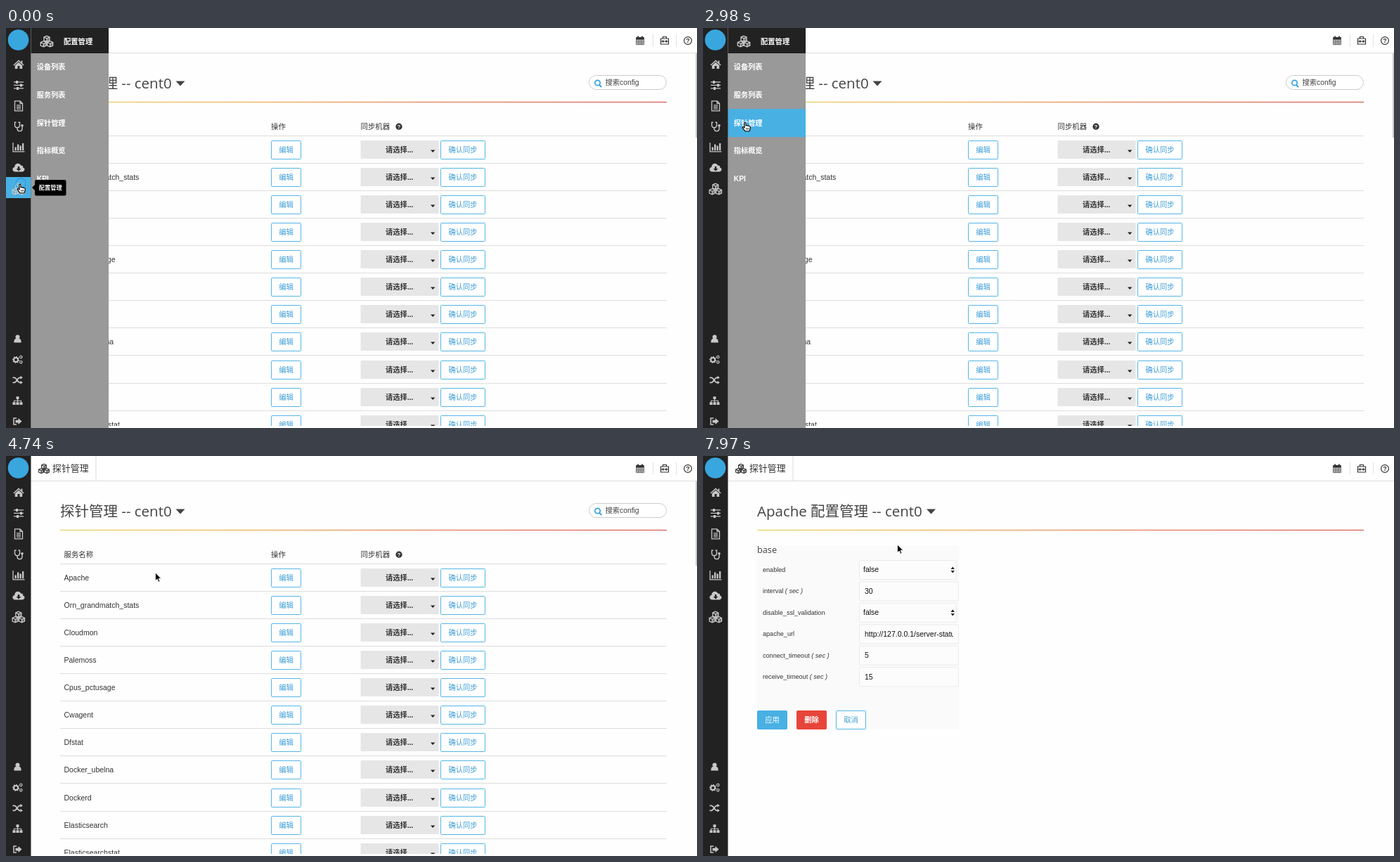
An HTML page that plays this animation: 983 by 569 pixels, repeating every 8 s.

```html
<!DOCTYPE html>
<html lang="zh-CN">
<head>
<meta charset="utf-8">
<title>探针管理</title>
<style>
html, body { margin: 0; width: 100%; height: 100%; overflow: hidden; background: #fefefe; }
svg { display: block; width: 983px; height: 569px; }
text { font: 10.5px "Liberation Sans", "Noto Sans CJK SC", "Noto Sans CJK", sans-serif; fill: #333; white-space: pre; }
.title { font-family: "Open Sans", "Noto Sans CJK SC", "Noto Sans CJK", sans-serif; fill: #444; }
</style>
</head>
<body>
<svg id="stage" viewBox="0 0 983 569" xmlns="http://www.w3.org/2000/svg"></svg>
<script>
const BLUE = '#49b0e4', DARK = '#222', LOOP = 8000;

const rect = (x, y, w, h, fill, more = '') =>
  `<rect x="${x}" y="${y}" width="${w}" height="${h}" fill="${fill}" ${more}/>`;
const text = (x, y, s, style = '', more = '') =>
  `<text x="${x}" y="${y}" style="${style}" ${more}>${s}</text>`;
const path = (d, more = '') => `<path d="${d}" ${more}/>`;
const at = (x, y, body, more = '') => `<g transform="translate(${x} ${y})" ${more}>${body}</g>`;
const group = (id, body, more = '') => `<g id="${id}" ${more}>${body}</g>`;
const line = (d, w = 1.4) => path(d, `fill="none" stroke="currentColor" stroke-width="${w}"`);
const solid = d => path(d, 'fill="currentColor"');
const dot = (x, y, r) => `<circle cx="${x}" cy="${y}" r="${r}" fill="currentColor"/>`;

// Icons, centred on their own origin
const cube = (x, y) => at(x, y,
  line('M0-4L4-2.3V2.3L0 4.2-4 2.3V-2.3ZM-4-2.2L0-.4 4-2.2M0-.4V4', 1.3) +
  solid('M0-.4L4-2.2V2.3L0 4.2Z').replace('/>', ' opacity=".45"/>'));
const cubes = cube(0, -3.7) + cube(-4.7, 3.7) + cube(4.7, 3.7);
const cog = (x, y, r) => at(x, y,
  `<circle r="${r}" fill="none" stroke="currentColor" stroke-width="${r * .65}"/>` +
  `<circle r="${r * 1.45}" fill="none" stroke="currentColor" stroke-width="${r * .4}" pathLength="16" stroke-dasharray="1"/>`);
const icons = {
  home: solid('M0-6.5L3.5-3.3V-5.5H5.3V-1.7L7.6.4 6.7 1.4 0-4.5-6.7 1.4-7.6.4ZM-5.2 1.2L0-3.3 5.2 1.2V6H1.5V2H-1.5V6H-5.2Z'),
  sliders: line('M-7-4.5H7M-7 0H7M-7 4.5H7', 1.3) + solid('M-4-6.5h3v4h-3ZM2-2h3v4h-3ZM-3 2.5h3v4h-3Z'),
  doc: line('M-5.5-7H2L5.5-3.5V7H-5.5ZM2-7V-3.5H5.5M-3-1H3M-3 1.7H3M-3 4.3H3', 1.3),
  scope: line('M-3.5-6H-5.5V-2C-5.5 2.6 1.5 2.6 1.5-2V-6H-.5M-2 1.5V3C-2 7.6 5 7.6 5 3V-.5') + dot(5, -1.5, 1.8),
  chart: line('M-8-6.5V6.2H8.5', 1.3) + solid('M-5.5 0h2.3v4.7h-2.3ZM-2-4h2.3v8.7h-2.3ZM1.5-2h2.3v6.7h-2.3ZM5-5.5h2.3v10.2h-2.3Z'),
  cloud: solid('M-4.5 5.5C-10 5.5-9.5-1-5.6-1.3-6-6.5 1.5-8 3-3.4 6-4.3 6.8-1.3 6-.4 10 .6 8.8 5.5 5 5.5Z') +
    path('M-1.2-2H1.2V1H3.4L0 4.4-3.4 1H-1.2Z', `fill="${DARK}"`),
  user: dot(0, -2.6, 3) + solid('M-5.2 5.5C-5.2 1-3.5 0-2.4 0H2.4C3.5 0 5.2 1 5.2 5.5Z'),
  cogs: cog(-2.4, .5, 3) + cog(4.8, -3.4, 1.6) + cog(4.8, 3.9, 1.6),
  shuffle: line('M-7-3.5H-4.5C-1.5-3.5 0 3.5 3 3.5H5M-7 3.5H-4.5C-1.5 3.5 0-3.5 3-3.5H5', 1.7) +
    solid('M4-6L7.3-3.5 4-1ZM4 1L7.3 3.5 4 6Z'),
  tree: solid('M-2-6h4v3.8h-4ZM-7 2h4v3.8h-4ZM-2 2h4v3.8h-4ZM3 2h4v3.8h-4Z') + line('M0-3V2M-5 2V0H5V2', 1.1),
  exit: line('M-1.5-4.5H-5.5V4.5H-1.5', 1.5) + solid('M-3-1.8H1V-4.5L6 0 1 4.5V1.8H-3Z'),
  calendar: line('M-5.4-4.5H5.4V5.6H-5.4ZM-5.4-1.6H5.4M-5.4.8H5.4M-5.4 3.2H5.4M-2.7-1.6V5.6M0-1.6V5.6M2.7-1.6V5.6', .8) +
    solid('M-5.4-5H5.4V-2H-5.4ZM-3.8-6.5h1.8v3h-1.8ZM2-6.5h1.8v3h-1.8Z'),
  kit: line('M-5.5-3H5.5V5H-5.5ZM-2.5-3V-5.5H2.5V-3M-5.5 1H5.5', 1.2) + solid('M-3.4-.4h2v3h-2ZM1.4-.4h2v3h-2Z'),
  help: '<circle r="5.4" fill="none" stroke="currentColor" stroke-width="1.2"/>' +
    text(0, 3.2, '?', 'font-size:9px;font-weight:bold', 'text-anchor="middle"')
};
const icon = (name, x, y) => at(x, y, icons[name]);

const button = (x, y, w, label, fill = '#fff', ink = '#3c9dd8', edge = '#55b5e6', weight = 400) =>
  rect(x + .5, y + .5, w - 1, 26, fill, `stroke="${edge}" rx="1"`) +
  text(x + w / 2, y + 17.1, label, `font-size:10.3px;font-weight:${weight};fill:${ink}`, 'text-anchor="middle"');
const caret = x => path(`M${x} 75.5h13l-6.5 7Z`, 'fill="#444"');
const title = s => text(77, 86, s, 'font-size:20.5px', 'class="title"');
const rule = y => rect(77, y, 863, 1.3, 'url(#warm)');

// Service list
const services = ['Apache', 'Orn_grandmatch_stats', 'Cloudmon', 'Palemoss', 'Cpus_pctusage', 'Cwagent',
  'Dfstat', 'Docker_ubelna', 'Dockerd', 'Elasticsearch', 'Elasticsearchstat'];
const tableHead = text(82.5, 144, '服务名称', 'font-size:10.4px') + text(377, 144, '操作', 'font-size:10.4px') +
  text(504.5, 144, '同步机器', 'font-size:10.4px') + '<circle cx="559" cy="140.2" r="4.6" fill="#333"/>' +
  text(559, 143.2, '?', 'font-size:8px;font-weight:bold;fill:#fff', 'text-anchor="middle"') +
  rect(77, 153, 863, 1, '#ddd');
const serviceRow = (name, i) => at(0, Math.round(i * 39.07),
  text(82.5, 177, name) + button(377, 160, 43, '编辑') +
  rect(504.5, 160, 111, 26, '#e6e6e6', 'rx="1"') +
  text(540, 177, '请选择...', 'font-size:10.3px;font-weight:bold') +
  path('M604 173.5h6.4l-3.2 3.5Z', 'fill="#222"') +
  button(618, 160, 64, '确认同步') + rect(77, 192, 863, 1, '#ddd'));
const search = rect(829.5, 67.5, 110, 20, '#fff', 'rx="10" stroke="#ccc"') +
  '<circle cx="841.5" cy="78" r="3.7" fill="none" stroke="#35a3dc" stroke-width="1.7"/>' +
  path('M844 81l3.2 3', 'stroke="#35a3dc" stroke-width="2"') + text(852.5, 81.2, '搜索config', 'font-size:10.3px;fill:#444');
const listPage = title('探针管理 -- cent0') + caret(241.5) + search + rule(104.8) + tableHead +
  services.map(serviceRow).join('') + group('editHot', button(377, 160, 43, '编辑', BLUE, '#fff')) +
  rect(981, 36, 2, 120, '#c9c9c9');
const listLoading = title('探针管理 --') + rule(104) + at(0, -1, tableHead);

// Configuration form
const fields = [['enabled', 'false'], ['interval', '30', 1], ['disable_ssl_validation', 'false'],
  ['apache_url', 'http://127.0.0.1/server-status'], ['connect_timeout', '5', 1], ['receive_timeout', '15', 1]];
const field = ([name, value, sec], i) => {
  const pick = value === 'false';
  return at(0, i * 30.45,
    text(85, 165, name + (sec ? '<tspan font-style="italic"> ( sec )</tspan>' : ''), 'font-size:9.1px') +
    rect(222.5, 148.5, pick ? 138 : 141, 27, '#fcfcfc', 'stroke="#ebebeb" rx="1"') +
    text(pick ? 228 : 230, 165.3, value, 'fill:#111', 'clip-path="url(#field)"') +
    (pick ? path('M352.5 161l2.7-3.6 2.7 3.6ZM352.5 163l2.7 3.6 2.7-3.6Z', 'fill="#222"') : ''));
};
const actions = button(77, 157, 43, '应用', BLUE, '#fff', BLUE, 500) +
  button(133, 157, 43, '删除', '#e8453a', '#fff', '#e8453a', 700) + button(189, 157, 43, '取消');
const form = rect(77, 128, 287, 260, '#fafafa') +
  text(77, 138, 'base', 'font-size:12.7px', 'class="title"') + fields.map(field).join('');

// Frame around the pages
const header = rect(35, 0, 948, 35, '#fff') + rect(35, 35, 948, 1, '#ddd') + rect(127.5, 0, 1, 35, '#ddd') +
  at(54, 18, `<g transform="scale(.85)">${cubes}</g>`) + text(66, 22.2, '探针管理', 'font-size:12.9px') +
  icon('calendar', 902, 18) + icon('kit', 937, 18) + icon('help', 970, 18) +
  rect(920, 9, 1, 18, '#e2e2e2') + rect(953, 9, 1, 18, '#e2e2e2');
const topIcons = ['home', 'sliders', 'doc', 'scope', 'chart', 'cloud'];
const lowIcons = ['user', 'cogs', 'shuffle', 'tree', 'exit'];
const sidebar = rect(0, 0, 35.5, 569, DARK) + group('sideHot', rect(0, 212, 35.5, 30, BLUE)) +
  '<circle cx="17.5" cy="17" r="14.8" fill="#39a6de"/>' +
  topIcons.map((n, i) => icon(n, 18, 52 + i * 29.4)).join('') + at(17.8, 229, cubes) +
  lowIcons.map((n, i) => icon(n, 16.5, 442 + i * 29.4)).join('');
const menuItems = ['设备列表', '服务列表', '探针管理', '指标概览', 'KPI'];
const menu = rect(35.5, 0, 110.5, 36, DARK) + rect(35.5, 36, 110.5, 533, '#999') +
  at(58, 19, cubes, 'color="#ccc"') + text(82, 22.8, '配置管理', 'font-size:10.3px;font-weight:bold;fill:#fff') +
  rect(35.5, 0, 110.5, 40, BLUE, 'id="menuHot"') +
  menuItems.map((s, i) => text(43.8, 59 + i * 39.8, s, 'font-size:10.2px;font-weight:bold;fill:#fff')).join('');
const tooltip = rect(41, 216, 44.5, 22.5, '#000', 'rx="2"') + path('M37 227l4-4v8Z') +
  text(63.2, 230.2, '配置管理', 'font-size:8.2px;font-weight:bold;fill:#fff', 'text-anchor="middle"');
const status = rect(-2.5, 560.5, 331, 14, '#f4f4f4', 'rx="2" stroke="#bbb"') +
  text(2, 569.8, 'app.cwiz.cn:3000/cmdb/config/edit?configName=Apache&amp;serviceName=collecto...', 'font-size:8.8px;fill:#222');
const arrow = path('M0 0V11.5L2.7 9 4.5 13.2 6.4 12.4 4.6 8.3H8.2Z', 'fill="#000" stroke="#fff" stroke-width=".8"');
const hand = path('M-1 1.2C-1-.2 1-.2 1 1.2V5C1.4 4.2 3 4.2 3.3 5.2 4 4.6 5.2 4.9 5.4 5.8 6.4 5.3 7.4 6 7.3 7V9.5L6 12.8H0L-3.6 8.2C-4.4 6.9-3 6-2 7L-1 8Z',
  'fill="#fff" stroke="#000" stroke-width="1.1" stroke-linejoin="round"') + path('M1.6 8V10.8M3.4 8V10.8M5.2 8V10.8', 'stroke="#000" stroke-width=".7"');
const ring = '<circle r="7.2" fill="none" stroke="#2d9fe0" stroke-width="1.4"/>';

const stage = document.getElementById('stage');
stage.innerHTML = `<defs>
  <linearGradient id="warm" gradientUnits="userSpaceOnUse" x1="77" x2="940"><stop stop-color="#e6d565"/>
    <stop offset=".3" stop-color="#edb458"/><stop offset=".65" stop-color="#e37d5c"/><stop offset="1" stop-color="#d9605a"/></linearGradient>
  <clipPath id="page"><path d="M35 36H983V566H35Z"/></clipPath>
  <clipPath id="field"><path d="M222 140H356V180H222Z"/></clipPath></defs>` +
  rect(0, 0, 983, 569, '#fefefe') +
  `<g clip-path="url(#page)">` + group('list', listPage) + group('loading', listLoading) +
  group('editWait', title('Apache 配置管理 --') + rule(104)) +
  group('editReady', title('Apache 配置管理 -- cent0') + caret(318) + rule(104.8)) +
  group('form', form) + group('actions', actions) + '</g>' +
  group('header', header, 'color="#333"') + group('menu', menu) + group('sidebar', sidebar, 'color="#c8c8c8"') +
  group('tooltip', tooltip) + group('status', status) + group('ring', ring) +
  group('arrow', arrow) + group('hand', hand);

const el = {};
stage.querySelectorAll('[id]').forEach(n => el[n.id] = n);
const show = (id, on) => el[id].setAttribute('visibility', on ? 'visible' : 'hidden');
const place = (id, x, y) => el[id].setAttribute('transform', `translate(${x} ${y})`);

// Pointer route: time, x, y
const route = [[0, 20, 222], [780, 20, 222], [1080, 21, 228], [1400, 19, 225], [1880, 19, 225], [2080, 38, 211],
  [2400, 56, 150], [2620, 60, 134], [3090, 60, 134], [3091, 59, 132.5], [3689, 59, 132.5], [3690, 61, 131.5],
  [3870, 61, 131.5], [4050, 150, 55], [4200, 232, 10], [4340, 236, 60], [4500, 220, 188], [4620, 213, 168],
  [4740, 212.5, 166], [5270, 212.5, 166], [5380, 234, 163], [5740, 234, 163], [6190, 373, 179.5],
  [6350, 386, 177], [6530, 379.5, 179.5], [7300, 379.5, 179.5], [7620, 320, 150], [7970, 276.5, 126], [8000, 276.5, 126]];

function pointer(t) {
  const i = Math.max(1, route.findIndex(p => p[0] >= t));
  const [a, x, y] = route[i - 1], [b, u, v] = route[i];
  const k = (t - a) / (b - a);
  return [x + (u - x) * k, y + (v - y) * k];
}

function draw(t) {
  const within = (a, b) => t >= a && t < b;
  const [x, y] = pointer(t);
  const menuOpen = t < 3090;
  const onSide = menuOpen && x < 35.5 && y >= 212;
  const onMenu = menuOpen && !onSide;
  const onEdit = within(5740, 6950) && x >= 376;

  show('list', t < 3090 || within(3510, 6950));
  show('loading', within(3090, 3510));
  show('editHot', onEdit);
  show('editWait', within(6950, 7010));
  show('editReady', t >= 7010);
  show('form', t >= 7150);
  show('actions', t >= 6950);
  place('actions', 0, t >= 7150 ? 205 : t >= 7010 ? 1 : 0);

  show('menu', menuOpen);
  show('menuHot', onMenu);
  place('menuHot', 0, 35.5 + 39.8 * Math.min(4, Math.floor((y - 35.5) / 39.8)));
  show('sideHot', onSide);
  show('tooltip', onSide);
  show('status', onEdit || within(6950, 7480));
  el.status.setAttribute('opacity', t < 6620 ? .85 : 1);

  const isHand = menuOpen || onEdit || within(6950, 7300);
  show('hand', isHand);
  show('arrow', !isHand);
  place('hand', x, y);
  place('arrow', x, y);
  place('ring', x + 1, y - 1);
  show('ring', t < 60 || within(2800, 2930) || within(6770, 6890));
}

function tick() {
  draw(performance.now() % LOOP);
  requestAnimationFrame(tick);
}
tick();
</script>
</body>
</html>
```
